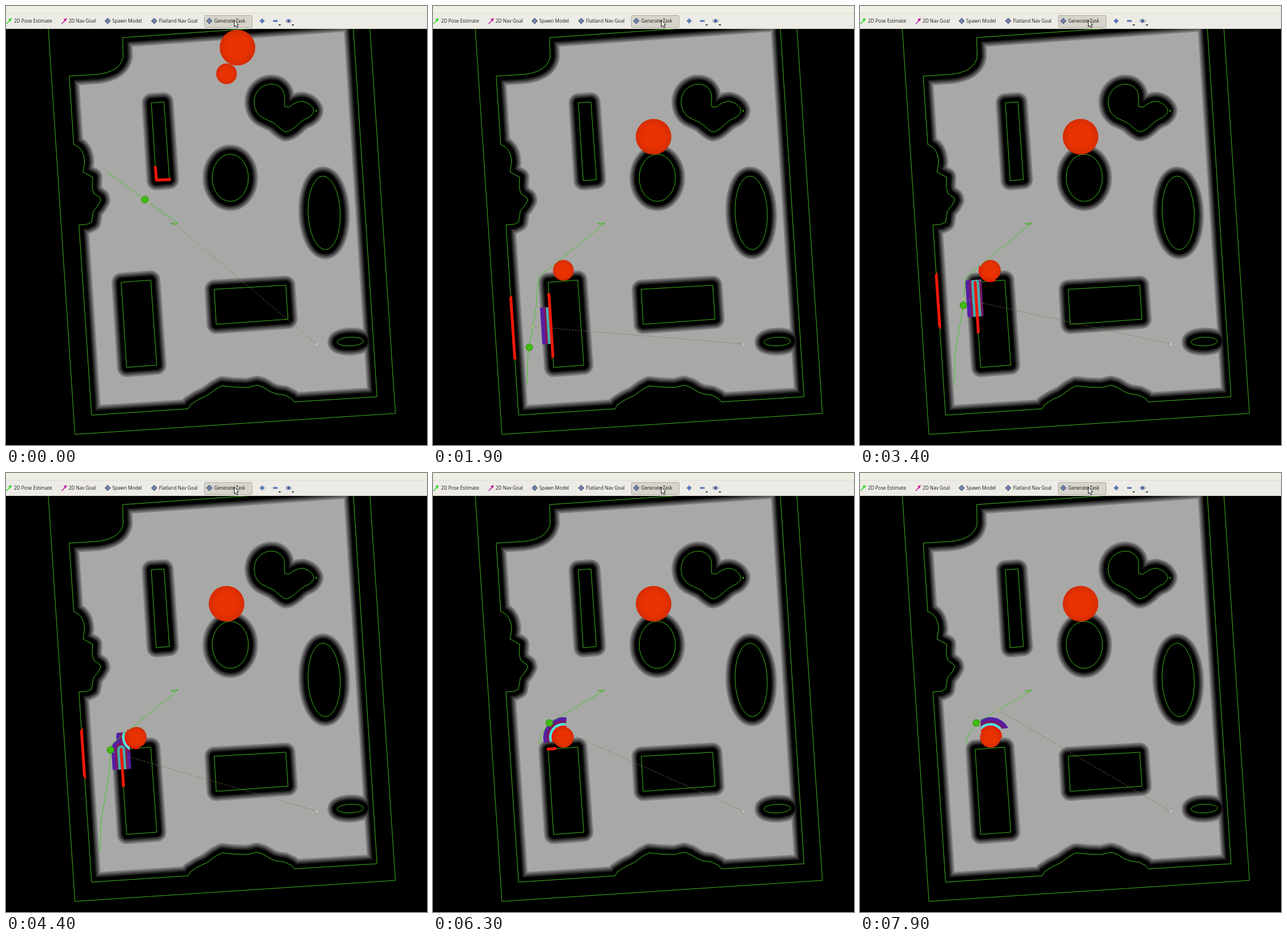
Recreate the animation shown at these times as an HTML page with a canvas. Size 733 by 764 pixels, loop 8000 ms.

```html
<!DOCTYPE html>
<html>
<head>
<meta charset="utf-8">
<style>
html, body { margin: 0; width: 100%; height: 100%; overflow: hidden; background: #000; }
canvas { display: block; }
</style>
</head>
<body>
<canvas id="stage" width="733" height="764"></canvas>
<script>
const W = 733, H = 764, LOOP = 8000, TAU = Math.PI * 2;
const RESPAWN = 300, REPLAN = 4800;
const GREEN = '#3db41a', RED = '#f01808';
const view = document.getElementById('stage').getContext('2d');
const backdrop = document.createElement('canvas');
backdrop.width = W;
backdrop.height = H;

function poly(points, closed = true) {
  const path = new Path2D();
  for (let i = 0; i < points.length; i += 2) path.lineTo(points[i], points[i + 1]);
  if (closed) path.closePath();
  return path;
}

function oval(x, y, rx, ry, tilt = 0) {
  const path = new Path2D();
  path.ellipse(x, y, rx, ry, tilt, 0, TAU);
  return path;
}

function stroke(c, path, color, width = 1) {
  c.strokeStyle = color;
  c.lineWidth = width;
  c.stroke(path);
}

function fill(c, path, color) {
  c.fillStyle = color;
  c.fill(path);
}

const floor = new Path2D(
  'M110 122L159 119Q200 114 204 88L203 55L604 27L646 680L502 689L497 683L485 677L470 675' +
  'L460 671L447 663L437 660L420 664L395 663L376 661L365 667L350 678L335 685L321 694L317 701' +
  'L149 712L127 381L141 380L149 376L152 357L160 347L165 338L164 334L153 326L150 316L151 298' +
  'L134 289L137 272Q136 247 118 241Z');
const heart = new Path2D(
  'M432 168C432 148 447 136 462 136C477 136 485 147 485 158L485 175L493 176Q506 165 517 166' +
  'Q531 169 536 181Q536 188 527 194Q514 199 505 209Q494 219 487 219Q482 218 467 204L446 194Q433 186 432 168Z');
const outer = poly([73, 30, 120, 745.5, 678, 709, 633, 30]);
const obstacles = [
  heart,
  poly([253, 168.5, 275, 167, 284.5, 302, 261.5, 304]),
  poly([200.5, 481, 252, 477, 262.5, 625, 210, 629]),
  poly([362.5, 493, 487, 486, 491, 545, 366, 554]),
  oval(390.5, 299, 31.5, 41),
  oval(554, 360, 28, 64, -0.04),
  oval(599.5, 584, 23, 7.5, -0.04)
];

function drawMap(c) {
  c.fillStyle = '#000';
  c.fillRect(0, 0, W, H);
  c.save();
  c.clip(floor);
  fill(c, floor, '#a8a8a7');
  c.lineJoin = 'round';
  for (let r = 17; r >= 7; r--) {
    const v = Math.round(14 * (r - 7));
    for (const shape of [floor, ...obstacles]) stroke(c, shape, `rgb(${v},${v},${v})`, 2 * r);
  }
  for (const shape of obstacles) fill(c, shape, '#000');
  c.restore();
  for (const shape of [outer, floor, ...obstacles]) stroke(c, shape, GREEN);
  c.fillStyle = GREEN;
  c.fillRect(539, 181, 2, 3);
}

function drawToolbar(c) {
  c.fillStyle = '#edebe5';
  c.fillRect(0, 0, W, 40);
  c.fillStyle = '#f0efe4';
  c.fillRect(0, 0, W, 12);
  c.fillStyle = '#dddbd1';
  c.fillRect(0, 12, W, 1);
  c.fillStyle = '#c9c7be';
  c.fillRect(0, 39, W, 1);

  const button = new Path2D();
  button.roundRect(345.5, 16.5, 83, 21, 2);
  fill(c, button, '#d6d4cb');
  stroke(c, button, '#aeaca3');

  c.fillStyle = '#1c1c1c';
  c.font = '8.2px "Open Sans", "Noto Sans", sans-serif';
  const labels = [['2D Pose Estimate', 14], ['2D Nav Goal', 109], ['Spawn Model', 185],
    ['Flatland Nav Goal', 266.5], ['Generate Task', 362.5]];
  for (const [text, x] of labels) c.fillText(text, x, 29);

  for (const [x, color] of [[0, '#22d822'], [96, '#c4129c']]) {
    stroke(c, poly([x + 1, 31, x + 7, 25], false), color, 1.5);
    fill(c, poly([x + 10, 21, x + 8, 27, x + 4, 23]), color);
  }
  for (const x of [177, 258, 354]) {
    const diamond = poly([x, 21, x + 5, 26, x, 31, x - 5, 26]);
    fill(c, diamond, '#7080ac');
    stroke(c, diamond, '#48546f');
  }

  c.fillStyle = '#5273b8';
  c.fillRect(442, 24.5, 8, 3);
  c.fillRect(444.5, 22, 3, 8);
  c.fillRect(465, 24.5, 8, 3);
  fill(c, oval(492, 26, 5, 3), '#c6cce0');
  stroke(c, oval(492, 26, 5, 3), '#8088a0');
  fill(c, oval(492, 26, 2.3, 2.3), '#344f94');
  for (const x of [476.5, 499.5]) fill(c, poly([x - 2.5, 32, x + 2.5, 32, x, 34.5]), '#222');

  const cursor = poly([397.5, 24.5, 397.5, 36, 400, 34, 402, 38, 404, 37, 402, 33, 405, 32.5]);
  fill(c, cursor, '#fff');
  stroke(c, cursor, '#111');
}

// Time, x, y of the robot
const route = [[300, 164, 606], [700, 165, 600], [1900, 173, 558], [3400, 180, 510],
  [4400, 183, 485], [4800, 185, 473], [6300, 200, 437], [7900, 241, 413], [8000, 244, 411.5]];
// Start time, x, y of the green marker
const markers = [[0, 242, 337], [RESPAWN, 167.5, 594], [3100, 180, 521], [4350, 182, 482], [6250, 202.5, 435]];

const firstPlan = poly([175, 288, 242, 337, 299, 377], false);
const longPlan = poly([164, 660, 165, 610, 167.5, 594, 175, 550, 180, 520, 182, 490, 184, 472, 299, 378], false);
const shortPlan = poly([184, 472, 188, 458, 195, 445, 203, 435, 242, 412, 299, 378], false);
const goalArrow = poly([286, 379, 299, 377.5, 294, 381, 289, 379], false);

const wall = poly([127, 381, 149, 712], false);
const face = poly([200.5, 481, 210, 629], false);
const ledge = poly([200.5, 480.5, 213, 479.5], false);
const corner = poly([260, 281, 262, 303, 285, 302], false);
const ball = { x: 227, y: 460, r: 18 };

function robotAt(t) {
  if (t < RESPAWN) return [249, 342];
  const i = Math.max(1, route.findIndex(p => p[0] > t));
  const [t0, x0, y0] = route[i - 1], [t1, x1, y1] = route[i];
  const k = (t - t0) / (t1 - t0);
  return [x0 + (x1 - x0) * k, y0 + (y1 - y0) * k];
}

// The part of the small ball that faces the robot
function visibleArc(x, y) {
  const dx = x - ball.x, dy = y - ball.y;
  const mid = Math.atan2(dy, dx), half = Math.acos(ball.r / Math.hypot(dx, dy));
  const path = new Path2D();
  path.arc(ball.x, ball.y, ball.r, mid - half, mid + half);
  return path;
}

function drawCostmap(c, x, y, arc, seesFace) {
  const wallX = 127 + (y - 381) * 22 / 331, faceX = 200.5 + (y - 481) * 9.5 / 148;
  const hits = [];
  if (wallX > x - 32) hits.push(wall);
  if (seesFace && faceX < x + 33) hits.push(face);

  c.save();
  c.translate(x, y);
  c.rotate(-0.065);
  c.beginPath();
  c.rect(-32, -32, 65, 64);
  c.rotate(0.065);
  c.translate(-x, -y);
  c.clip();
  const bands = [[17, '#5020aa'], [14, '#5c1c9c'], [11, '#761670'], [9, '#80144e'], [7, '#45abab']];
  for (const [r, color] of bands) {
    c.lineCap = 'round';
    for (const hit of hits) stroke(c, hit, color, 2 * r);
    c.lineCap = 'butt';
    stroke(c, arc, r === 7 ? '#50e2de' : color, 2 * r);
  }
  c.restore();
}

function drawScan(c, x, y, arc, seesFace) {
  c.save();
  c.beginPath();
  c.arc(x, y, 65, 0, TAU);
  c.clip();
  stroke(c, wall, RED, 5);
  if (seesFace) stroke(c, face, RED, 5);
  else stroke(c, ledge, RED, 5);
  stroke(c, arc, RED, 5);
  c.restore();
}

function disc(c, x, y, r, light, dark) {
  const shade = c.createRadialGradient(x, y, r * 0.6, x, y, r);
  shade.addColorStop(0, light);
  shade.addColorStop(1, dark);
  fill(c, oval(x, y, r, r), shade);
}

function drawFrameLink(c, x, y) {
  c.setLineDash([1.5, 3.5]);
  stroke(c, poly([x, y, 540, 588], false), '#777650');
  c.setLineDash([]);
  c.fillStyle = '#c8c078';
  c.fillRect(x - 2, y - 1, 4, 2);
  c.fillStyle = '#e4dcdc';
  c.fillRect(540, 587, 2, 3);
}

function draw(t) {
  const c = view, [x, y] = robotAt(t);
  c.drawImage(backdrop, 0, 0);
  const spawned = t >= RESPAWN;
  if (spawned) {
    const arc = visibleArc(x, y), seesFace = t < 6000;
    drawCostmap(c, x, y, arc, seesFace);
    drawScan(c, x, y, arc, seesFace);
  } else {
    c.lineCap = c.lineJoin = 'round';
    stroke(c, corner, RED, 5);
  }
  stroke(c, !spawned ? firstPlan : t < REPLAN ? longPlan : shortPlan, '#42c826');
  stroke(c, goalArrow, GREEN);
  drawFrameLink(c, x, y);

  const balls = spawned ? [[384, 227.5, 31], [ball.x, ball.y, ball.r]] : [[403, 72.5, 31], [384, 118, 18]];
  for (const [bx, by, r] of balls) disc(c, bx, by, r, '#e93202', '#d42c02');
  const [, mx, my] = markers.findLast(m => m[0] <= t);
  disc(c, mx, my, 6.5, '#40bc12', '#2f9a0e');
  c.drawImage(backdrop, 0, 0, W, 40, 0, 0, W, 40);
}

const base = backdrop.getContext('2d');
drawMap(base);
drawToolbar(base);

const start = performance.now();
function tick() {
  const t = (performance.now() - start) % LOOP;
  draw(Math.floor(t / 100) * 100);
  requestAnimationFrame(tick);
}
tick();
</script>
</body>
</html>
```
